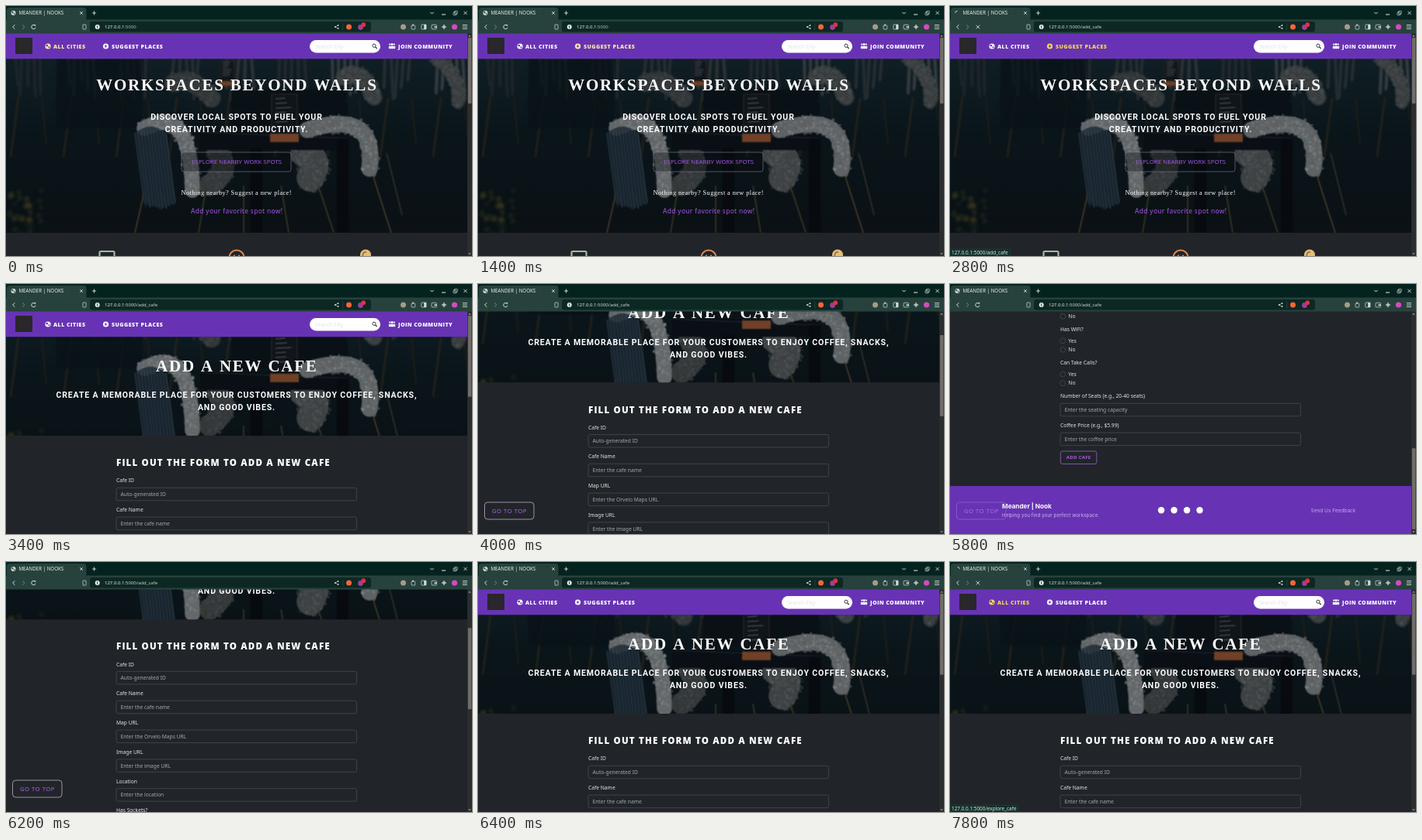
Animation, 600 px wide and 323 px high, one loop 8000 ms. Source, as an HTML page with a canvas:

```html
<!DOCTYPE html>
<html lang="en">
<head>
<meta charset="utf-8">
<title>Cafe finder</title>
<style>
html, body { margin: 0; width: 100%; height: 100%; overflow: hidden; background: #212529; }
canvas { display: block; width: 600px; height: 323px; }
</style>
</head>
<body>
<canvas id="stage"></canvas>
<script>
const W = 600, H = 323, LOOP = 8000, STEP = 200;
const SANS = '"Noto Sans", sans-serif', HEAVY = '"Open Sans", sans-serif';
const SERIF = '"Liberation Serif", serif', ROBOTO = 'Roboto, sans-serif', INTER = 'Inter, sans-serif';
const PAGE = '#212529', PURPLE = '#6733b4', LINK = '#a455e4', ICON = '#d3dedb', BAR = '#27423d';
const VIEW = 288, HOME_HEIGHT = 935, FORM_HEIGHT = 758, MAX_SCROLL = FORM_HEIGHT - VIEW;

const canvas = document.getElementById('stage');
const dpr = window.devicePixelRatio || 1;
canvas.width = W * dpr;
canvas.height = H * dpr;
let ctx = canvas.getContext('2d');

// Drawing helpers
function text(str, x, y, size, color, { font = SANS, weight = 400, spacing = 0, align = 'left' } = {}) {
  ctx.font = `${weight} ${size}px ${font}`;
  ctx.letterSpacing = spacing + 'px';
  ctx.textAlign = align;
  ctx.fillStyle = color;
  ctx.fillText(str, x + (align === 'center' ? spacing / 2 : 0), y);
}
function paint(fill, stroke, width) {
  if (fill) { ctx.fillStyle = fill; ctx.fill(); }
  if (stroke) { ctx.strokeStyle = stroke; ctx.lineWidth = width; ctx.stroke(); }
}
function rect(x, y, w, h, color) {
  ctx.fillStyle = color;
  ctx.fillRect(x, y, w, h);
}
function box(x, y, w, h, r, fill, stroke, width = 0.7) {
  ctx.beginPath();
  ctx.roundRect(x, y, w, h, r);
  paint(fill, stroke, width);
}
function disc(x, y, r, fill, stroke, width = 0.8) {
  ctx.beginPath();
  ctx.arc(x, y, r, 0, Math.PI * 2);
  paint(fill, stroke, width);
}
function arc(x, y, r, from, to, color, width = 0.9) {
  ctx.beginPath();
  ctx.arc(x, y, r, from, to);
  paint(null, color, width);
}
function line(x0, y0, x1, y1, color, width = 0.9) {
  ctx.beginPath();
  ctx.moveTo(x0, y0);
  ctx.lineTo(x1, y1);
  paint(null, color, width);
}
function plus(x, y, r, color, width) {
  line(x - r, y, x + r, y, color, width);
  line(x, y - r, x, y + r, color, width);
}
function cross(x, y, r, color) {
  line(x - r, y - r, x + r, y + r, color);
  line(x - r, y + r, x + r, y - r, color);
}
// Open angle or filled triangle pointing along `angle`
function wedge(x, y, r, angle, color, filled) {
  ctx.save();
  ctx.translate(x, y);
  ctx.rotate(angle);
  ctx.beginPath();
  ctx.moveTo(-r / 2, -r);
  ctx.lineTo(r / 2, 0);
  ctx.lineTo(-r / 2, r);
  paint(filled && color, !filled && color, 1);
  ctx.restore();
}
function clipped(x, y, w, h, draw) {
  ctx.save();
  ctx.beginPath();
  ctx.rect(x, y, w, h);
  ctx.clip();
  draw();
  ctx.restore();
}

// Motion helpers
const clamp = v => Math.min(1, Math.max(0, v));
const smooth = k => k * k * (3 - 2 * k);
const hover = (t, on, off) => Math.min(clamp((t - on + 200) / 400), clamp((off - t) / 400));
function scrollAt(t) {
  const down = clamp((t - 3760) / 1640);
  const up = smooth(clamp((t - 5800) / 600));
  return MAX_SCROLL * down * (1 - up);
}
function tint(k) {
  return `rgb(${255 - 9 * k},${255 - 38 * k},${255 - 175 * k})`;
}

let seed = 7;
function random(from = 0, to = 1) {
  seed = seed * 16807 % 2147483647;
  return from + seed / 2147483647 * (to - from);
}
const grey = (v, alpha = 1) => `rgba(${v},${v + 4},${v + 6},${alpha})`;

// Tufts scattered along a bent path
function fur([x0, y0], [cx, cy], [x1, y1], width, tone) {
  ctx.beginPath();
  ctx.moveTo(x0, y0);
  ctx.quadraticCurveTo(cx, cy, x1, y1);
  ctx.lineCap = 'round';
  paint(null, grey(tone * 0.85), width * 0.85);
  ctx.lineCap = 'butt';
  for (let i = 0; i < 350; i++) {
    const k = random(), a = random(0, 6.28), d = Math.sqrt(random()) * width / 2;
    const x = (1 - k) ** 2 * x0 + 2 * k * (1 - k) * cx + k * k * x1 + Math.cos(a) * d;
    const y = (1 - k) ** 2 * y0 + 2 * k * (1 - k) * cy + k * k * y1 + Math.sin(a) * d;
    disc(x, y, random(0.7, 2.2), grey(Math.round(tone * random(0.75, 1.2)), 0.6));
  }
}
// Knitted throw hanging from a chair back
function knit(x, y, w, h, lean) {
  for (let i = 0; i <= w; i++) {
    const bend = Math.sin(i / w * Math.PI);
    line(x + i, y - bend * 8, x + i + lean, y + h + bend * 5 + random(-3, 3), i % 4 ? '#1c2934' : '#2f3c47', 1.4);
  }
}
function menuBoard(x, y, w, h) {
  rect(x, y, w, h, '#10151a');
  box(x, y, w, h, 0.5, null, '#2e2a29', 1);
  rect(x - 2, y + h - 3, w + 4, h / 5, '#704126');
  for (let i = 1; i < 7; i++) line(x + w * 0.15, y + i * h / 9, x + w * random(0.5, 0.85), y + i * h / 9 - 1, '#68747a', 0.8);
}

function makePhoto() {
  const layer = document.createElement('canvas'), scale = 2, main = ctx;
  layer.width = W * scale;
  layer.height = 225 * scale;
  ctx = layer.getContext('2d');
  ctx.scale(scale, scale);
  ctx.translate(0, -68);
  const soften = px => { ctx.filter = `blur(${px * scale}px)`; };

  const shade = ctx.createLinearGradient(0, 68, 0, 293);
  shade.addColorStop(0, '#101f25');
  shade.addColorStop(0.45, '#0a151a');
  shade.addColorStop(1, '#0b1115');
  rect(0, 68, W, 225, shade);

  // Distant chairs: pale slats above brass legs
  soften(1.2);
  for (let group = 0; group < 9; group++) {
    const left = 12 + group * 68, tone = Math.round(random(38, 75));
    for (let i = 0; i < 5; i++) {
      line(left + i * 8, 66, left + i * 8 + random(-4, 4), random(95, 125), grey(tone, 0.75), 3.5);
    }
    line(left + 4, 118, left - 6, 195, '#33291a', 1.8);
    line(left + 34, 118, left + 40, 180, '#241f18', 1.8);
  }
  rect(65, 68, 110, 90, 'rgba(9,18,23,.75)');
  fur([215, 100], [240, 88], [265, 120], 26, 62);
  fur([435, 92], [458, 78], [474, 118], 24, 72);
  fur([555, 70], [585, 85], [582, 125], 18, 70);
  rect(290, 108, 150, 50, '#0a1116');
  menuBoard(276, 70, 18, 30);
  soften(2);
  for (let i = 0; i < 26; i++) disc(random(0, 46), random(232, 293), random(1.5, 4), i % 2 ? '#36371d' : '#1c251b');

  // Seats seen behind the table, then the table itself
  soften(0.7);
  fur([272, 190], [292, 212], [262, 232], 32, 62);
  fur([384, 190], [405, 196], [392, 222], 42, 74);
  for (let i = 0; i < 4; i++) line(258 + i * 48, 232, 248 + i * 58, 293, '#373621', 1.7);
  rect(250, 163, 190, 23, '#0a0f15');
  line(250, 163, 440, 171, '#1b242c', 1.2);
  rect(315, 184, 15, 109, '#070b10');
  rect(426, 171, 15, 122, '#070b10');

  // Near chairs and their throws
  line(178, 240, 166, 293, '#4a3b27', 1.6);
  line(468, 205, 496, 293, '#4a3b27', 1.6);
  line(490, 190, 510, 270, '#33302a', 1.6);
  fur([178, 158], [238, 125], [240, 238], 23, 118);
  fur([388, 160], [478, 132], [468, 210], 25, 112);
  knit(166, 164, 40, 92, 12);
  menuBoard(342, 114, 33, 54);
  ctx = main;
  return layer;
}
const photo = makePhoto();

function globe(x, y, r, color, land) {
  disc(x, y, r, color);
  disc(x - r * 0.35, y - r * 0.25, r * 0.38, land);
  disc(x + r * 0.4, y + r * 0.35, r * 0.3, land);
}

function nav(cities, suggest) {
  const style = { font: HEAVY, weight: 800, spacing: 0.5 };
  rect(0, 35, 594, 33.5, PURPLE);
  rect(12, 41, 22, 21, '#29272b');
  globe(54, 52, 3.6, tint(cities), PURPLE);
  text('ALL CITIES', 61, 54.6, 7, tint(cities), style);
  disc(128.5, 52, 3.6, tint(suggest));
  plus(128.5, 52, 1.8, PURPLE, 1);
  text('SUGGEST PLACES', 136, 54.6, 7, tint(suggest), style);
  box(391, 44, 91, 16.5, 8.2, '#fff');
  text('Search City', 398, 54.6, 7, '#e3e0e7');
  disc(474, 51.3, 2.1, null, '#2b2b33', 0.9);
  line(475.6, 53, 477.6, 55, '#2b2b33', 1.1);
  for (let i = -1; i <= 1; i++) {
    const r = i ? 1.1 : 1.5;
    disc(497 + i * 2.8, 49.6, r, '#fff');
    box(497 + i * 2.8 - r * 1.3, 51.8, r * 2.6, 3.4, 1.2, '#fff');
  }
  text('JOIN COMMUNITY', 505, 54.6, 7, '#fff', { ...style, spacing: 0.43 });
}

function hero(height, shift) {
  clipped(0, 68.5, 594, height, () => ctx.drawImage(photo, 0, 68 + shift, 600, 225));
}
function heading(str, y) {
  text(str, 296.5, y, 21, '#fff', { font: SERIF, weight: 700, spacing: 1.77, align: 'center' });
}
function tagline(...lines) {
  lines.forEach((str, i) =>
    text(str, 296.5, 147.3 + i * 16, 10.5, '#fff', { font: ROBOTO, weight: 700, spacing: 0.86, align: 'center' }));
}

function homePage() {
  hero(225, 0);
  heading('WORKSPACES BEYOND WALLS', 109);
  tagline('DISCOVER LOCAL SPOTS TO FUEL YOUR', 'CREATIVITY AND PRODUCTIVITY.');
  box(226, 189, 141, 25, 3, 'rgba(8,11,17,.35)', '#77717f');
  text('EXPLORE NEARBY WORK SPOTS', 297, 204.3, 7.8, LINK, { spacing: 0.05, align: 'center' });
  text('Nothing nearby? Suggest a new place!', 296.5, 244, 8.3, '#fff', { font: SERIF, spacing: 0.4, align: 'center' });
  text('Add your favorite spot now!', 297, 268.4, 8.4, LINK, { spacing: 0.35, align: 'center' });

  box(120.5, 317, 19, 14, 1.5, null, '#a3b9a0', 2.2);
  disc(297, 325, 9.5, null, '#dd8653', 2);
  for (const side of [-1, 1]) disc(297 + side * 3, 322.6, 1, '#dd8653');
  disc(463, 321.5, 7, '#e3bd78');
  arc(463, 321.5, 3.5, 2, 5, '#7a5b2c', 1.2);
}

function field(label, hint, y) {
  text(label, 142, y + 2.4, 6.7, '#e2e5e8');
  box(142, y + 9.3, 309.5, 16.5, 2.2, PAGE, '#4b5156');
  text(hint, 147.5, y + 20, 6.7, '#a3a9ae');
}
function choice(label, y) {
  text(label, 142, y + 2.4, 6.7, '#e2e5e8');
  ['Yes', 'No'].forEach((answer, i) => {
    disc(145.3, y + 14.7 + i * 11.5, 3.4, null, '#4b5156', 0.7);
    text(answer, 152.3, y + 17 + i * 11.5, 6.7, '#e2e5e8');
  });
}

function formPage() {
  hero(127.5, -49);
  heading('ADD A NEW CAFE', 112.5);
  tagline('CREATE A MEMORABLE PLACE FOR YOUR CUSTOMERS TO ENJOY COFFEE, SNACKS,', 'AND GOOD VIBES.');
  text('FILL OUT THE FORM TO ADD A NEW CAFE', 142, 235.3, 11.5, '#fff', { font: HEAVY, weight: 800, spacing: 1.2 });
  const fields = {
    'Cafe ID': 'Auto-generated ID',
    'Cafe Name': 'Enter the cafe name',
    'Map URL': 'Enter the Orvelo Maps URL',
    'Image URL': 'Enter the image URL',
    'Location': 'Enter the location'
  };
  Object.entries(fields).forEach(([label, hint], i) => field(label, hint, 254 + i * 37.8));
  ['Has Sockets?', 'Has Toilet?', 'Has WiFi?', 'Can Take Calls?']
    .forEach((label, i) => choice(label, 442.3 + i * 43.2));
  field('Number of Seats (e.g., 20-40 seats)', 'Enter the seating capacity', 615);
  field('Coffee Price (e.g., $5.99)', 'Enter the coffee price', 652.8);
  box(142.3, 686, 46.5, 16.5, 2.5, null, '#a86bd8');
  text('ADD CAFE', 165.5, 696.4, 6, '#b45cf2', { weight: 700, spacing: 0.3, align: 'center' });

  rect(0, 731, 594, 62, PURPLE);
  text('Meander | Nook', 67, 760, 8.2, '#fff', { font: INTER, weight: 700 });
  text('Helping you find your perfect workspace.', 67, 770.6, 6.2, '#cdb6ec', { font: INTER, spacing: 0.1 });
  for (let i = 0; i < 4; i++) disc(272 + i * 16.5, 762.3, 4.2, '#fff');
  text('Send Us Feedback', 464.5, 765, 6.5, '#c4a8ea', { font: INTER });
}

function topButton(scroll) {
  const overFooter = scroll > 440;
  box(8.5, 282, 63.5, 22, 4, null, overFooter ? '#8d62cf' : '#b9b2c2', 0.8);
  text('GO TO TOP', 40.2, 295.8, 7.7, overFooter ? '#ad6ae8' : '#b45cf2', { spacing: 0.5, align: 'center' });
}

function scrollbar(scroll, pageHeight) {
  const scale = 276 / pageHeight;
  rect(594, 35, 6, VIEW, '#2c2d2e');
  box(594.8, 41 + scroll * scale, 4.6, VIEW * scale, 1, '#716d6a');
  wedge(597, 38.7, 1.8, -Math.PI / 2, '#aaa', true);
  wedge(597, 320.3, 1.8, Math.PI / 2, '#aaa', true);
}

function tabStrip(loading, t) {
  rect(0, 0, W, 18, '#04231e');
  rect(0, 17.5, W, 18, BAR);
  box(1, 2, 102.5, 18, 4, BAR);
  if (loading) {
    const turn = t / 400 * Math.PI;
    arc(9.5, 9, 2.7, turn, turn + 1.6, ICON);
  } else {
    globe(9.5, 9, 3, ICON, BAR);
  }
  text('MEANDER | NOOKS', 16.5, 11.3, 6.2, '#e6eeec');
  cross(97, 9, 1.8, ICON);
  plus(113.5, 9, 2.5, ICON);
  wedge(548.5, 9, 2.2, Math.PI / 2, ICON);
  line(561, 11, 566, 11, ICON, 1.1);
  box(576, 8, 3.8, 3.8, 0.4, null, ICON);
  box(577.5, 6.5, 3.8, 3.8, 0.4, null, ICON, 0.6);
  cross(591.5, 9, 2.1, ICON);
}

function toolbar(path, loading) {
  wedge(10, 27, 2.7, Math.PI, ICON);
  wedge(22.5, 27, 2.7, 0, '#6f8681');
  if (loading) {
    cross(36, 27, 2.3, ICON);
  } else {
    arc(35.5, 27, 2.7, 0.3, 5.4, ICON, 1);
    wedge(37.6, 25.2, 1.6, Math.PI / 4, ICON, true);
  }
  box(99, 24, 4, 6, 0.5, null, ICON);
  box(108, 20, 362, 13.5, 3, '#0d2823');
  disc(117.7, 27, 3, '#e3ebe9');
  line(117.7, 25.2, 117.7, 28.8, '#0d2823');
  text('127.0.0.1', 127, 29.2, 6, '#e9f1ef');
  text(':5000' + path, 127 + ctx.measureText('127.0.0.1').width, 29.2, 6, path ? '#ccd6d3' : '#aebbb8');
  for (const side of [-1, 1]) {
    line(423.8, 27, 427.6, 27 + side * 2, ICON, 0.6);
    disc(427.6, 27 + side * 2, 0.9, ICON);
  }
  disc(423.8, 27, 0.9, ICON);
  line(433.8, 22.5, 433.8, 31.5, '#3d5751', 0.6);
  disc(441.5, 27, 3.5, '#f2653a');
  disc(456.5, 27.5, 3.4, '#9a3f9c');
  disc(460.2, 24.2, 2.9, '#e2303d');

  disc(511.5, 27, 3.5, '#a79b84');
  box(522, 25, 4.8, 5, 0.8, null, ICON);
  disc(524, 24.5, 1, ICON);
  box(534.8, 24, 6.2, 6, 0.8, null, ICON);
  rect(538.2, 24, 2.8, 6, ICON);
  box(548, 24.3, 6.4, 5.6, 0.9, null, ICON);
  rect(551.5, 26.3, 3, 1.8, ICON);
  plus(564, 27, 3, ICON, 1.2);
  cross(564, 27, 1.3, ICON);
  disc(577.5, 27, 3.6, '#d34bc0');
  for (let i = -1; i <= 1; i++) line(587.8, 27 + i * 2.4, 594, 27 + i * 2.4, ICON);
}

function statusBubble(path) {
  const label = '127.0.0.1:5000/' + path;
  ctx.font = `400 6.4px ${SANS}`;
  ctx.letterSpacing = '0px';
  box(-3, 314.3, ctx.measureText(label).width + 8, 12, 2.5, '#10312b', '#2b4a44', 0.5);
  text(label, 2, 321, 6.4, '#dde6e3');
}

function render(now) {
  const t = Math.floor(now % LOOP / STEP) * STEP;
  const onHome = t < 3200, scroll = scrollAt(t);
  const cities = t < 4000 ? hover(t, 0, 1000) : hover(t, 7200, LOOP + 400);
  const suggest = hover(t, 1400, 3600) * (t < 3400);
  const loading = t >= 2000 && onHome || t >= 7800;

  ctx.setTransform(dpr, 0, 0, dpr, 0, 0);
  rect(0, 0, W, H, PAGE);
  clipped(0, 35, 594, VIEW, () => {
    ctx.translate(0, -scroll);
    nav(cities, suggest);
    onHome ? homePage() : formPage();
  });
  if (scroll > 20) topButton(scroll);
  scrollbar(scroll, onHome ? HOME_HEIGHT : FORM_HEIGHT);
  tabStrip(loading, t);
  toolbar(t < 2000 ? '' : '/add_cafe', loading);
  if (cities === 1) statusBubble('explore_cafe');
  if (suggest === 1) statusBubble('add_cafe');
}

const start = performance.now();
function tick() {
  render(performance.now() - start);
  requestAnimationFrame(tick);
}
tick();
</script>
</body>
</html>
```
